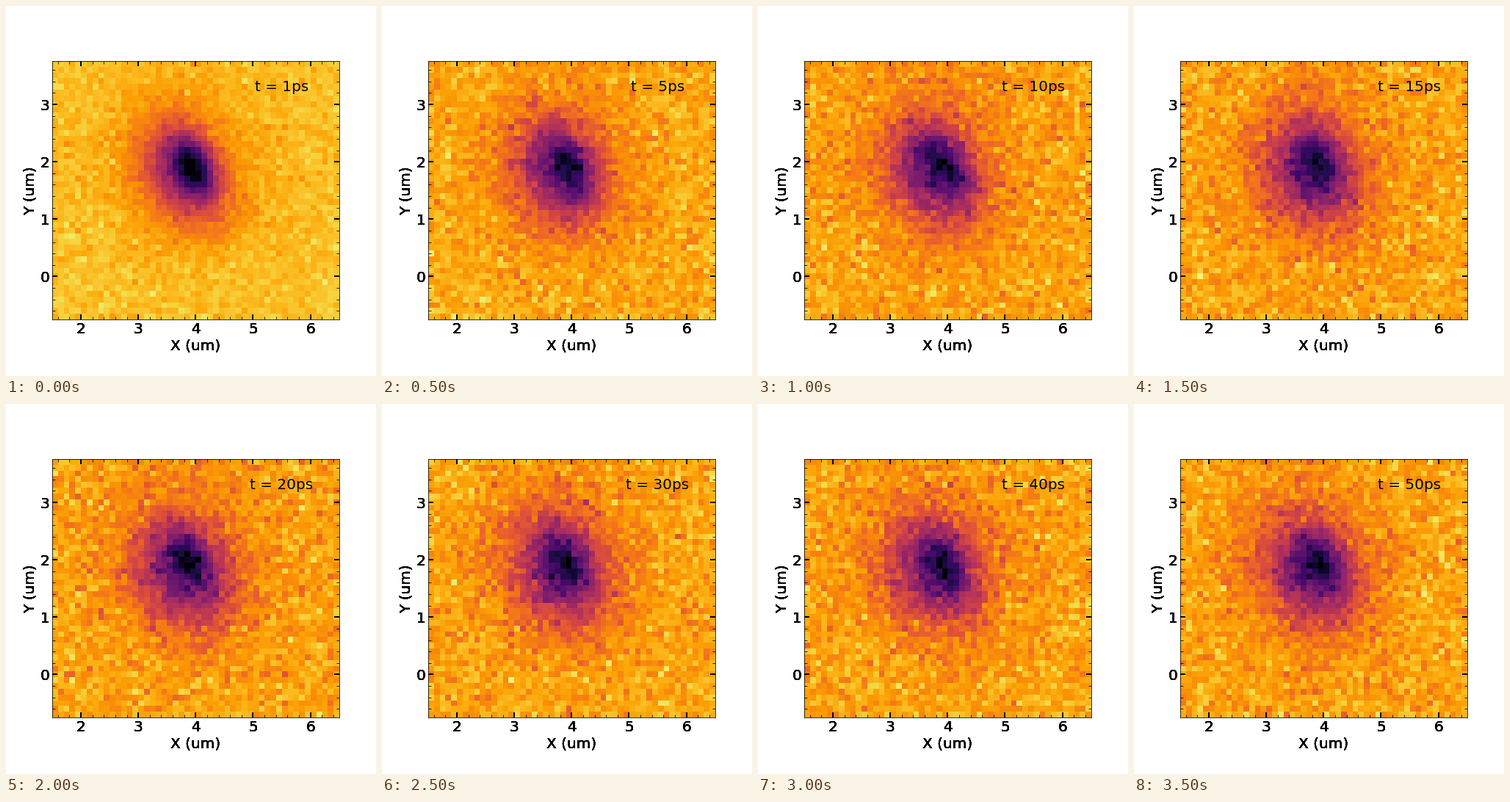
Write a matplotlib script that moves like this. It is 504 px wide and 504 px high and loops after 4000 ms.

```python
import numpy as np
import matplotlib.pyplot as plt
from matplotlib.animation import FuncAnimation
from matplotlib.ticker import AutoMinorLocator, MultipleLocator

SIZE, DPI = 504, 72
COLS, ROWS = 50, 45
EXTENT = (1.5, 6.5, -0.75, 3.75)
BOX = (63 / SIZE, 77 / SIZE, 390.6 / SIZE, 351.54 / SIZE)
LABEL_LAYERS = 8
TIMES = [1, 5, 10, 15, 20, 30, 40, 50]  # ps

plt.rcParams["font.family"] = "DejaVu Sans"
plt.rcParams["font.size"] = 20

xs = EXTENT[0] + (np.arange(COLS) + 0.5) / 10
ys = EXTENT[3] - (np.arange(ROWS) + 0.5) / 10
X, Y = np.meshgrid(xs, ys)


def bump(cx, cy, long, short, tilt, skew=0):
    """Gaussian of height one, leaning left by tilt degrees.

    A positive skew steepens the upper right flank and softens the other.
    """
    a = np.radians(90 + tilt)
    dx, dy = X - cx, Y - cy
    u = dx * np.cos(a) + dy * np.sin(a)
    v = dy * np.cos(a) - dx * np.sin(a)
    width = short * (1 + skew * np.sign(v))
    return np.exp(-(u / long) ** 2 / 2 - (v / width) ** 2 / 2)


def make_map(t):
    rng = np.random.default_rng(t)
    settle = 1 - np.exp(-(t - 1) / 2.5)
    drift = 0.14 * abs(np.sin(np.pi * t / 40))
    field = 0.860 - 0.058 * settle + np.zeros_like(X)
    field -= (0.46 - 0.02 * settle) * bump(
        3.90, 1.87, 0.60, 0.41 + 0.05 * settle, 25, skew=0.2)
    field -= (0.32 - 0.17 * settle) * bump(
        3.98 - 0.8 * drift, 1.88 + drift, 0.31, 0.20, 30)
    field -= (0.13 + 0.03 * settle) * bump(3.85, 1.9, 1.0, 0.9, 20)
    field += (0.030 + 0.023 * settle) * rng.standard_normal(field.shape)
    return np.clip(field, 0, 1)


def add_axes(overlay):
    ax = fig.add_axes(BOX)
    ax.set(xlim=EXTENT[:2], ylim=EXTENT[2:], xlabel="X (um)", ylabel="Y (um)")
    for axis in (ax.xaxis, ax.yaxis):
        axis.set_major_locator(MultipleLocator(1))
    if overlay:
        ax.patch.set_visible(False)
        ax.spines[:].set_visible(False)
        ax.tick_params(length=0)
    else:
        for axis in (ax.xaxis, ax.yaxis):
            axis.set_minor_locator(AutoMinorLocator(5))
        ax.tick_params(which="both", direction="in", top=True, right=True)
        ax.tick_params(which="major", length=7, width=2)
        ax.tick_params(which="minor", length=4, width=0.8)
    return ax


fig = plt.figure(figsize=(SIZE / DPI, SIZE / DPI), dpi=DPI, facecolor="white")
ax = add_axes(overlay=False)
# Repeated labels give the heavy lettering around the plot.
for _ in range(LABEL_LAYERS - 1):
    add_axes(overlay=True)

maps = [make_map(t) for t in TIMES]
image = ax.imshow(maps[0], cmap="inferno", vmin=0, vmax=1, extent=EXTENT,
                  aspect="auto", interpolation="nearest")
stamp = ax.text(0.8, 0.9, "", transform=ax.transAxes, ha="center", va="center")


def update(index):
    image.set_data(maps[index])
    stamp.set_text(f"t = {TIMES[index]}ps")
    return image, stamp


anim = FuncAnimation(fig, update, frames=len(TIMES), interval=500,
                     repeat=True, repeat_delay=0)
plt.show()
```
